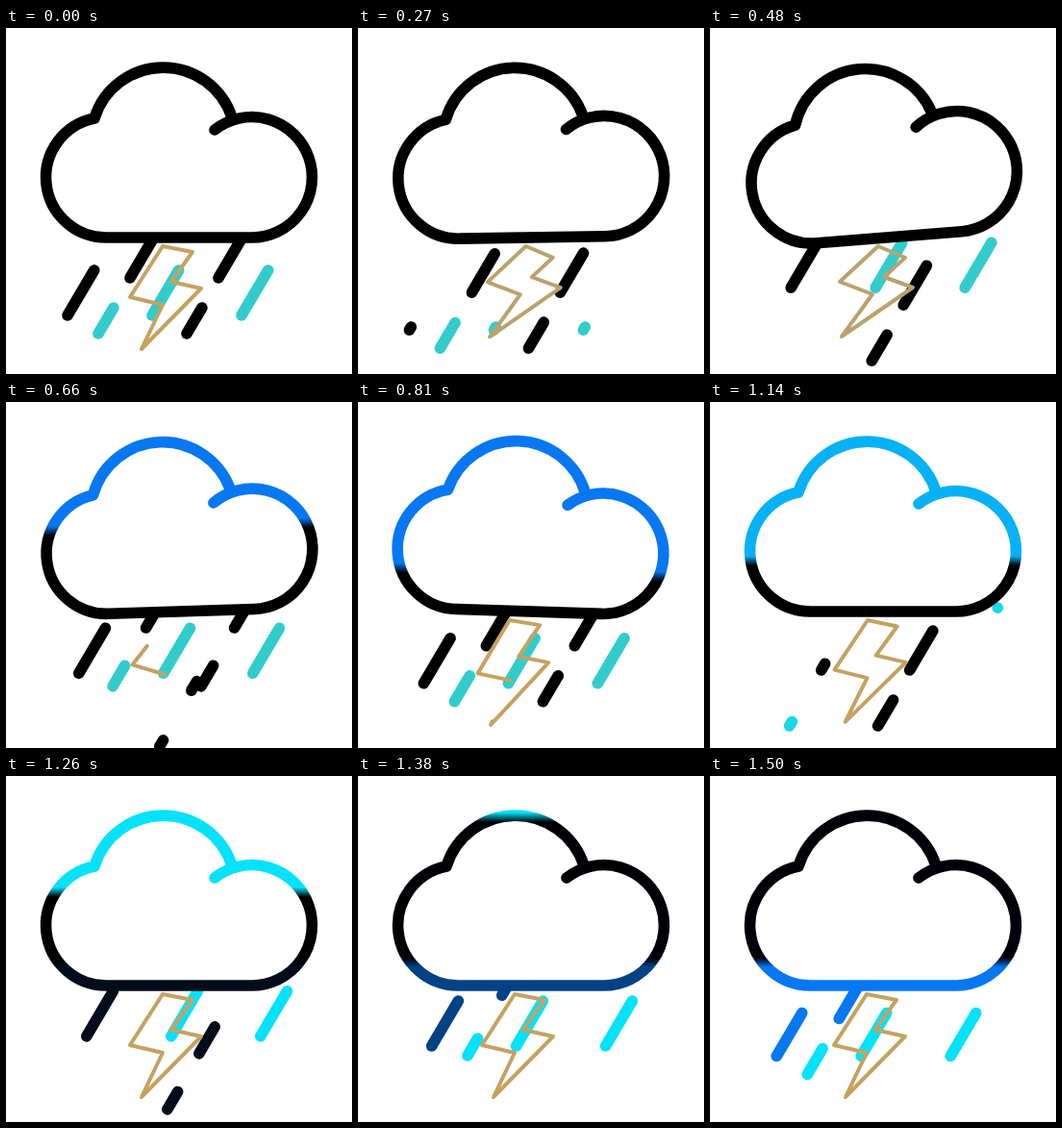
An HTML page that plays this animation: 360 px wide and 360 px high, repeating every 1530 ms.

```html
<!DOCTYPE html>
<html lang="en">
<head>
<meta charset="utf-8">
<title>Thunderstorm</title>
<style>
html, body { margin: 0; width: 100%; height: 100%; overflow: hidden; background: #fff; }
svg { display: block; width: 100vw; height: 100vh; }
</style>
</head>
<body>
<svg viewBox="0 0 360 360" fill="none" stroke-linecap="round" stroke-linejoin="round">
  <defs>
    <linearGradient id="ink" gradientUnits="userSpaceOnUse" x1="0" y1="0" x2="0" y2="360">
      <stop/><stop/><stop/><stop/>
    </linearGradient>
  </defs>
  <g id="rain" stroke-width="11.6"></g>
  <path id="cloud" fill="#fff" stroke="url(#ink)" stroke-width="11.6"
    d="M217 106A62.7 62.7 0 1 1 256 218H105A62.6 62.6 0 0 1 92 94A75 75 0 0 1 235 93"/>
  <path id="bolt" stroke-width="4" pathLength="1"/>
</svg>
<script>
const LOOP = 1530, STEP = 30;
const BLACK = [0, 0, 0], NAVY = [0, 0, 10], BLUE = [8, 119, 242], AQUA = [4, 226, 250];
const TEAL = [51, 204, 204], GOLD = [198, 161, 96], SAND = [185, 162, 110];
const CYCLE = 57, DRIFT = .7, LEAN = .59, WIPE = 12, EARLIER = 6;

const $ = id => document.getElementById(id);
const span = (t, a, b) => Math.max(0, Math.min(1, (t - a) / (b - a)));
const ease = (t, a, b) => (1 - Math.cos(Math.PI * span(t, a, b))) / 2;
const arch = (t, a, b) => Math.sin(Math.PI * span(t, a, b));
const pulse = (t, a, b) => arch(t, a, b) ** 2;
const mix = (a, b, k) => a.map((v, i) => v + (b[i] - v) * k);
const rgb = c => `rgb(${c.map(Math.round)})`;

// A lane repeats one drop; born and wipe are distances from its home position.
const drops = [];
function addLane(lane, count = 3) {
  for (let n = 0; n < count; n++) {
    const el = document.createElementNS("http://www.w3.org/2000/svg", "path");
    $("rain").append(el);
    drops.push({ ...lane, el, n });
  }
}
for (const x of [64, 152, 245])
  addLane({ x, y: 299, len: 47, cyan: x > 64, born: -38, wipe: 4 });
for (const [x, cyan, wipe, count] of [[129, true, 15, 3], [221, false, 31, 2]]) {
  addLane({ x, y: 260, len: 41, cyan: false, born: -24, wipe }, count);
  addLane({ x: x - 33, y: 318, len: 27, cyan, born: -24, wipe }, count);
}

const rest = [[163, 288], [129, 280], [163, 227], [194, 233], [172, 264], [203, 271], [141, 334]];
const bent = [[169, 277], [135, 264], [175, 227], [203, 239], [181, 259], [211, 270], [137, 321]];
const stops = document.querySelectorAll("#ink stop");

function setStop(i, y, color) {
  stops[i].setAttribute("offset", span(y, 0, 360));
  stops[i].setAttribute("stop-color", rgb(color));
}

function drawInk(t) {
  const edge = 211 * arch(t, 480, 1420) ** .6 - 20;
  const black = mix(BLACK, NAVY, span(t, 1260, 1500));
  const top = mix(BLUE, AQUA, span(t, 810, 1260) ** 2);
  setStop(0, edge - 5, edge < 0 ? black : top);
  setStop(1, edge + 5, black);
  setStop(2, 189, black);
  setStop(3, 199, mix(BLACK, BLUE, span(t, 1230, 1500)));
}

function drawDrop(d, fall, cyan) {
  const move = fall - CYCLE * d.n;
  const wipe = d.wipe - EARLIER * d.n;
  const shown = move > d.born && move < wipe + WIPE;
  d.el.style.display = shown ? "" : "none";
  if (!shown) return;
  const at = r => `${d.x - DRIFT * move + LEAN * r} ${d.y + move - r}`;
  const tail = d.len * (1 - span(move, wipe, wipe + WIPE));
  const head = d.len * (1 - span(move, d.born, d.born + 9));
  d.el.setAttribute("d", `M${at(tail)}L${at(head)}`);
  d.el.setAttribute("stroke", d.cyan ? cyan : "url(#ink)");
}

function drawBolt(t) {
  const back = pulse(t, 650, 970);
  const bend = ease(t, 0, 300) - ease(t, 510, 780) + .37 * pulse(t, 820, 1200) - .15 * back;
  const pts = rest.map((p, i) => mix(p, bent[i], bend).join(" "));
  const bolt = $("bolt");
  bolt.setAttribute("d", `M${pts.join("L")}Z`);
  bolt.setAttribute("transform", `translate(${-3.5 * back} 0)`);
  bolt.setAttribute("stroke", rgb(mix(GOLD, SAND, bend)));

  // Erase from the start, then draw again.
  const from = t < 620 ? span(t, 510, 620) : 0;
  const to = t < 620 ? 1 : span(t, 620, 840);
  bolt.style.display = to > from ? "" : "none";
  bolt.setAttribute("stroke-dasharray", to - from === 1 ? "none" : `${to - from} 2`);
  bolt.setAttribute("stroke-dashoffset", -from);
}

function draw(t) {
  drawInk(t);
  const tilt = 2 * pulse(t, 620, 1080) - 4.6 * pulse(t, 180, 800);
  $("cloud").setAttribute("transform", `rotate(${tilt} 180 140)`);

  const s = t / 1000, fall = s * (53 + 12 * s);
  const cyan = rgb(mix(TEAL, AQUA, span(t, 960, 1260)));
  for (const d of drops) drawDrop(d, fall, cyan);
  drawBolt(t);
}

const start = performance.now();
function tick() {
  const t = (performance.now() - start) % LOOP;
  draw(Math.floor(t / STEP) * STEP);
  requestAnimationFrame(tick);
}
tick();
</script>
</body>
</html>
```
